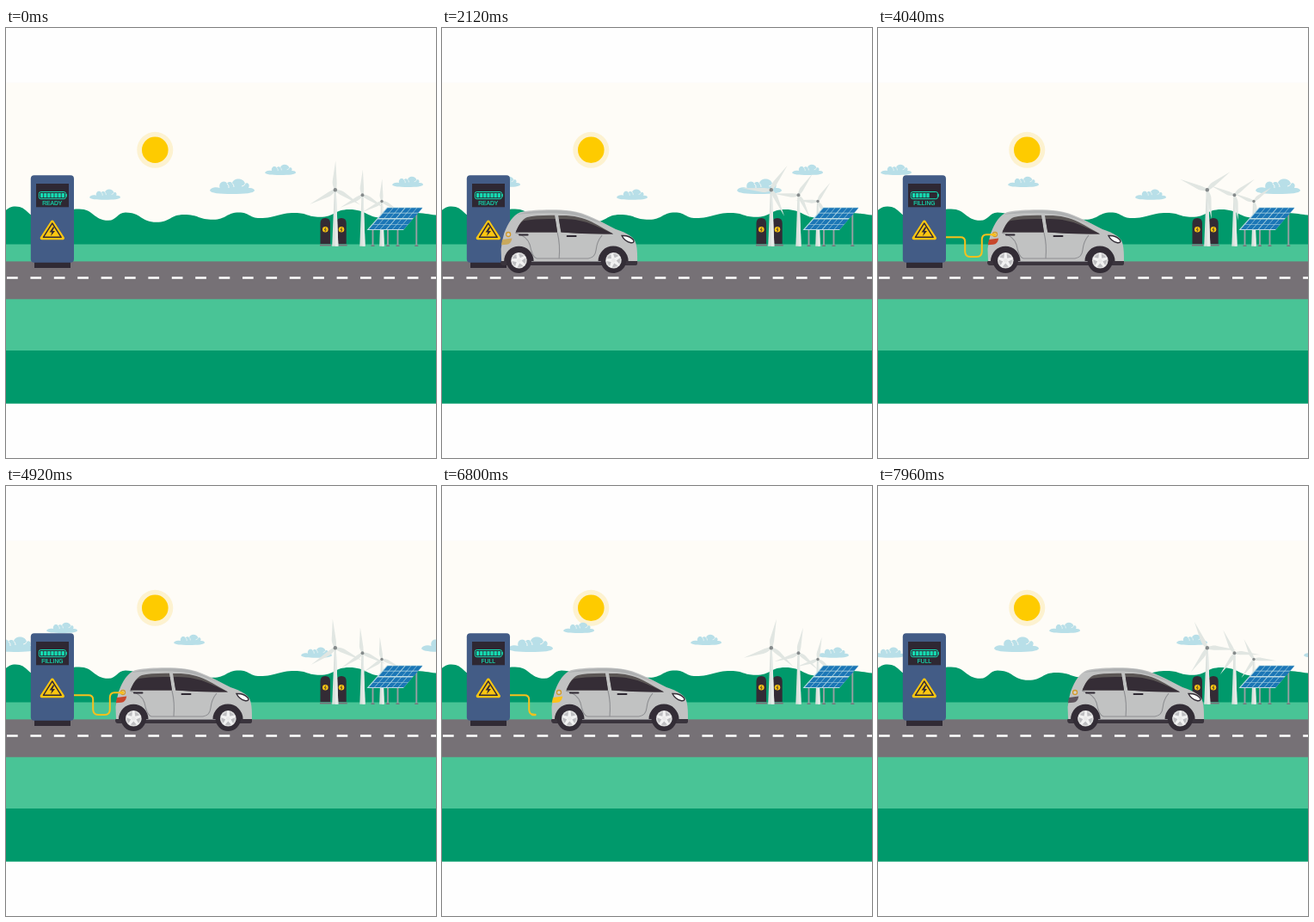
An HTML page for the animation above (8 s loop, 500 by 500 pixels).

```html
<!DOCTYPE html>
<html lang="en">
<head>
<meta charset="utf-8">
<title>Charging station</title>
<style>
  html, body { margin: 0; width: 100%; height: 100%; overflow: hidden; background: #fefefe; }
  svg { display: block; width: 100vw; height: 100vh; }
</style>
</head>
<body>
<svg viewBox="0 0 500 500">
  <defs>
    <g id="cloud" fill="#b8dfe8">
      <path d="M-26 2C-25-1.500-19-2.500-14.500-1C-16.500-8-8.500-11-6-6C-5-8.500-1.500-8.500 0-6.500C1-13 13-13.500 15-6C18-8 21-5 19-1C23-1.500 26 0 26 2C25 5 15 6 0 6C-15 6-25 5-26 2Z"/>
      <path d="M-6-6Q-3.500-4-4-1M0-6.500Q2-5 2-2M15-6Q14-3 11-3" fill="none" stroke="#fefcf7" stroke-width=".9"/>
    </g>
    <g id="skyline">
      <use href="#cloud" x="263" y="187"/>
      <use href="#cloud" transform="translate(115 195.500) scale(.69)"/>
      <use href="#cloud" transform="translate(319 166.800) scale(.69)"/>
      <use href="#cloud" transform="translate(467 180.800) scale(.69)"/>
    </g>
    <path id="blade" d="M-1 0C-2.800-5-3.600-8-3-11L.4-34L1.900-8L1.400 0Z" fill="#e1e6e2"/>
    <g id="battery">
      <path d="M365.500 251V227Q365.500 221 371.300 221T377 227V251Z" fill="#332b35"/>
      <path d="M365 252.500H378" stroke="#77747a" stroke-width="2"/>
      <circle cx="371.300" cy="234.300" r="3.300" fill="#fcc611"/>
      <path d="M372 232L370.300 234.700H372.300L370.900 236.800" fill="none" stroke="#332b35" stroke-width=".8"/>
    </g>
    <g id="wheel">
      <circle r="14.700" fill="#332d36"/>
      <circle r="9.300" fill="#dcdcdc"/>
      <circle r="7.600" fill="#bdbdc0"/>
    </g>
  </defs>

  <rect y="63.500" width="500" height="190" fill="#fefcf7"/>
  <circle cx="173.300" cy="141.800" r="21" fill="#fdf2d0"/>
  <circle cx="173.300" cy="141.800" r="15.300" fill="#fecb00"/>
  <g id="clouds"><use href="#skyline"/><use href="#skyline" x="-500"/></g>
  <path id="hills" fill="#00996b"/>
  <rect y="251.500" width="500" height="185" fill="#49c496"/>
  <rect y="271.400" width="500" height="43.900" fill="#767176"/>
  <path d="M1 290.400H500" stroke="#fff" stroke-width="2.500" stroke-dasharray="12.700 14.700"/>
  <rect y="375" width="500" height="61.600" fill="#00996b"/>

  <use href="#battery"/>
  <use href="#battery" x="18.700"/>
  <g id="turbines"></g>
  <g id="solar">
    <path d="M426.500 234V253M444 230V253M455.500 230V253M477.300 214V253" stroke="#98a0a3" stroke-width="1.900"/>
    <path d="M424.500 253.300h4M442 253.300h4M453.500 253.300h4M475.300 253.300h4" stroke="#70777a" stroke-width="1.600"/>
    <path d="M443 208.500H484.500L462 235H419.500Z" fill="#b9dbe4"/>
    <g id="cells" fill="#1b76b6" transform="matrix(1 0 -.87 1 443 209.300)"></g>
  </g>

  <g id="pump">
    <rect x="33" y="270" width="42" height="9" fill="#302a34"/>
    <rect x="28.800" y="171.200" width="50.200" height="101.500" rx="4" fill="#435c86"/>
    <rect x="35" y="181" width="38" height="27.300" fill="#2e2833"/>
    <g stroke="#14dcb2" fill="none">
      <rect x="38.400" y="190.500" width="31" height="8.200" rx="2"/>
      <path d="M70.300 192.800v3.600"/>
    </g>
    <g id="bars" fill="#14dcb2"></g>
    <text id="label" x="53.800" y="205.800" text-anchor="middle" font-family="'Liberation Sans', Arial, sans-serif" font-size="6.700" fill="#14dcb2" stroke="#14dcb2" stroke-width=".2"></text>
    <path d="M53.800 225.500L66 244.300H41.600Z" fill="#fcc611" stroke="#fcc611" stroke-width="4" stroke-linejoin="round"/>
    <path d="M53.800 227L64.200 243.300H43.400Z" fill="none" stroke="#332b35" stroke-width="1.400" stroke-linejoin="round"/>
    <path d="M54.600 231.500L50.600 237.500H53.300L52 242L57 236H54.200L56.400 231.500Z" fill="#332b35"/>
  </g>

  <g id="car">
    <path d="M130 268H284L286 271V274Q286 276 283 276H130Q127 276 127 272Z" fill="#3a343d"/>
    <path d="M128 271L127.500 257C129 248 130 240 133 234C138 223 144 215 153 213.500C166 211 194 210.500 208 212.600C227 215 242 225 261 234C275 238.500 283 243.500 284.500 251C286 257 286 264 286 271Z" fill="#c1c2c2"/>
    <path d="M146 217C155 212.500 192 211 208 213.200C223 215.500 237 223 251 230C235 223.500 222 218.500 207 216.500C190 214.800 164 214.800 146 217Z" fill="#aeb0b1"/>
    <g fill="#5b5655">
      <path d="M144.500 237.500C148 229 152 222 158 220Q168 217.500 190 217.800L193 237.500Z"/>
      <path d="M194 218C211 217.500 222 220 233 225.500C243 230.500 251 235.500 258 239.500Q226 240 197.300 237.600Z"/>
    </g>
    <g fill="#352d36">
      <path d="M144.500 237.500C147 231 150 226 154 224Q168 221.500 190.600 222L193 237.500Z"/>
      <path d="M194.800 222.200C211 221.500 224 224.500 235 229C245 233 252 236.500 258 239.500Q226 240 197.300 237.600Z"/>
    </g>
    <path d="M193 238Q196.500 252 195 268M144 238Q158 242 161 252Q164 267 169 268H229Q237 267 238 258Q239 248 245 241" fill="none" stroke="#8d8e91" stroke-width="1.100"/>
    <path d="M149 240.600h9.500M204.500 242h10" stroke="#2f2933" stroke-width="2" stroke-linecap="round"/>
    <path d="M160 271.500H246" stroke="#858489" stroke-width="1.200"/>
    <path d="M131 271A17 17 0 0 1 165.500 271ZM240.500 271A17.500 17.500 0 0 1 275.500 271Z" fill="#332d36"/>
    <path d="M268 241.500Q277 241 281.500 246.500Q283 250 278.500 249.800Q271 248 268 241.500Z" fill="#fff" stroke="#332d36" stroke-width="1.400"/>
    <path id="lamp" d="M129 246L140.300 244.500Q139 251.400 134 251.800L127.800 252.300Z"/>
    <circle cx="136" cy="240" r="2.500" fill="#d6d3c8" stroke="#d29b2c" stroke-width="1.300"/>
    <g class="wheel" data-x="148.300"><use href="#wheel"/></g>
    <g class="wheel" data-x="258.300"><use href="#wheel"/></g>
  </g>

  <g fill="none" stroke="#f9c01c">
    <path id="hose" pathLength="100" stroke-width="2" d="M79 243.200H96Q101 243.200 101.200 248V260Q101.500 266 107 266H115Q120.600 266 120.800 260V246Q121 240.300 126 240.300H137"/>
    <path id="plug" pathLength="100" stroke-width="2.700"/>
  </g>
</svg>
<script>
const LOOP = 8000, ARRIVE = 2546, DEPART = 7289, SPEED = 0.1385;
const $ = id => document.getElementById(id);
const clamp = v => Math.max(0, Math.min(1, v));

function add(parent, tag, attrs) {
  const el = document.createElementNS('http://www.w3.org/2000/svg', tag);
  for (const k in attrs) el.setAttribute(k, attrs[k]);
  return parent.appendChild(el);
}

// Ridge line: crests and troughs joined by level-ended curves
const ridge = [[-12, 217], [11, 207.5], [40, 221], [85, 210.5], [119, 223.8], [139, 214.5], [175, 225.8],
  [207, 217], [241, 222.8], [271, 214.5], [295, 221], [336, 215], [365, 219.8], [399, 211],
  [440, 221], [472, 215], [512, 218]];
$('hills').setAttribute('d', ridge.reduce((d, [x, y], i) => {
  if (!i) return `M${x} ${y}`;
  const [px, py] = ridge[i - 1], mid = (px + x) / 2;
  return `${d}C${mid} ${py} ${mid} ${y} ${x} ${y}`;
}, '') + 'V253H-12Z');

// Wind turbines: hub x, hub y, scale
const rotors = [[437, 201.5, .77], [414.5, 194.3, .88], [382.8, 188.3, 1]].map(([x, y, s]) => {
  const w = 3.6 * s;
  add($('turbines'), 'path', { d: `M${x - 1} ${y}L${x - w} 253.800H${x + w}L${x + 1} ${y}Z`, fill: '#dbe1dd' });
  add($('turbines'), 'path', { d: `M${x} ${y}V253.800H${x + w}L${x + 1} ${y}Z`, fill: '#e6ebe8' });
  const g = add($('turbines'), 'g', {});
  for (const a of [0, 120, 240]) add(g, 'use', { href: '#blade', transform: `rotate(${a})` });
  add($('turbines'), 'circle', { cx: x, cy: y, r: 2.2 * s, fill: '#858a8b' });
  return { g, place: `translate(${x} ${y}) scale(${s})` };
});

// Two solar panels of 6 x 2 cells
for (let r = 0; r < 4; r++)
  for (let c = 0; c < 6; c++)
    add($('cells'), 'rect', { x: .6 + c * 6.8 + (c > 2 ? .5 : 0), y: r * 6.1 + (r > 1 ? 1 : 0), width: 6.2, height: 5.5 });

const bars = [...Array(7)].map((_, i) =>
  add($('bars'), 'rect', { x: 40 + i * 4.1, y: 192, width: 3.3, height: 5.2 }));

const wheels = [...document.querySelectorAll('.wheel')];
for (const w of wheels) {
  for (let a = 0; a < 360; a += 72)
    add(w, 'path', { d: 'M-2.200 0L-1.300-8.500H1.300L2.200 0Z', fill: '#f2f2f2', transform: `rotate(${a})` });
  add(w, 'circle', { r: 2.4, fill: '#e9e9e9' });
}
$('plug').setAttribute('d', $('hose').getAttribute('d'));

function draw(t) {
  $('clouds').setAttribute('transform', `translate(${t * .05} 0)`);
  for (const { g, place } of rotors) g.setAttribute('transform', `${place} rotate(${t * .072})`);

  const x = SPEED * (Math.min(0, t - ARRIVE) + Math.max(0, t - DEPART));
  $('car').setAttribute('transform', `translate(${x} 0)`);
  for (const w of wheels)
    w.setAttribute('transform', `translate(${w.dataset.x} 270.300) rotate(${x / 14.7 * 180 / Math.PI})`);

  const plugged = t >= 3800 && t < 6300;
  $('lamp').setAttribute('fill', plugged ? '#c8472b' : t > DEPART ? '#5d545c' : t < ARRIVE ? '#c9a95c' : '#fcc21a');

  const len = 100 * Math.min(clamp((t - 2800) / 1000), clamp((7300 - t) / 1000));
  const tip = Math.min(5, len);
  $('hose').setAttribute('stroke-dasharray', `${len} 200`);
  $('plug').setAttribute('stroke-dasharray', `0 ${len - tip} ${tip} 200`);
  $('hose').parentNode.style.display = len ? '' : 'none';

  const filling = t >= ARRIVE && t < 6000;
  $('label').textContent = filling ? 'FILLING' : t < ARRIVE ? 'READY' : 'FULL';
  const level = filling ? 1 + Math.floor((t - ARRIVE) / 300) : 7;
  bars.forEach((b, i) => b.setAttribute('visibility', i < level ? 'visible' : 'hidden'));
}

const start = performance.now();
function tick() {
  draw((performance.now() - start) % LOOP);
  requestAnimationFrame(tick);
}
tick();
</script>
</body>
</html>
```
